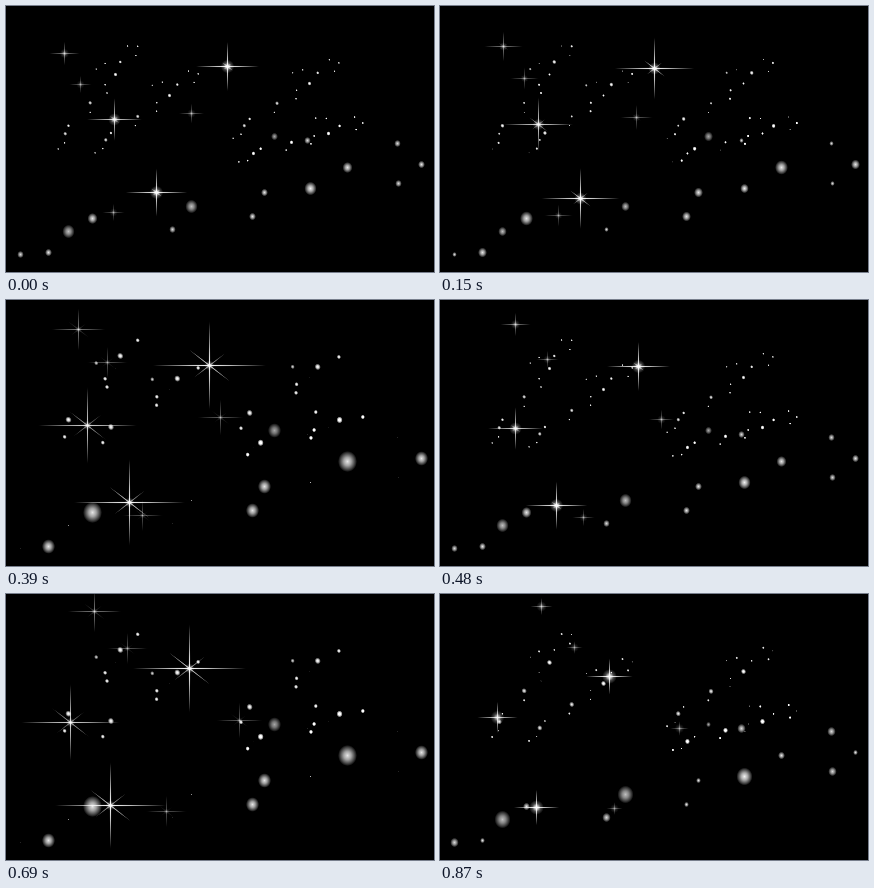
Write an HTML page with a canvas that moves like this. It is 428 px wide and 266 px high and loops after 0.9 s.

```html
<!DOCTYPE html>
<html lang="en">
<head>
<meta charset="utf-8">
<title>Night sky</title>
<style>
html, body { margin: 0; width: 100%; height: 100%; overflow: hidden; background: #000; }
canvas { display: block; }
</style>
</head>
<body>
<canvas id="sky" width="428" height="266"></canvas>
<script>
const ctx = document.getElementById('sky').getContext('2d');
const STEP = 30, STEPS = 30, TWINKLE = 10;

// Opacity from the centre outwards.
const DISC = [[0, 1], [0.4, 0.7], [0.8, 0.25], [1, 0]];
const GLOW = [[0, 1], [0.25, 0.8], [0.55, 0.3], [1, 0]];
const RAY = [[0, 1], [0.35, 0.75], [0.7, 0.36], [1, 0]];

// One trail of dots; early dots swell while the others shrink.
const trail = [
  { r: 11, alpha: 0.75, pts: [[-119, 18], [-242, 43]] },
  { r: 11, alpha: 0.95, pts: [[0, 0]] },
  { r: 5.8, alpha: 0.85, pts: [[87, -45], [88, -5], [-3, -48], [-138, 41], [-290, 66]] },
  { r: 10.6, alpha: 0.9, early: true, pts: [[37, -21], [-218, 30]] },
  { r: 7.3, alpha: 0.9, early: true, pts: [[111, -24], [-46, 4], [-58, 28], [-262, 64]] },
  { r: 7.3, alpha: 0.65, early: true, pts: [[-36, -52]] }
];

// The trail is laid out five times, turned and scaled.
const copies = [
  { x: 304, y: 182, turn: 0, scale: 1, gain: 1 },
  { x: 322, y: 127, turn: -4.8, scale: 0.316, gain: 2 },
  { x: 303, y: 77, turn: -22.8, scale: 0.316, gain: 1.35 },
  { x: 163, y: 89, turn: -24.8, scale: 0.316, gain: 1.35 },
  { x: 109, y: 68, turn: -39.6, scale: 0.316, gain: 1.35 }
];

// Each star drifts from start to bend, then on to end.
const stars = [
  { size: 1, alpha: 1, start: [221, 60], bend: [197, 66.4], end: [169, 82], at: 17 },
  { size: 0.87, alpha: 0.85, start: [108, 113], bend: [69, 131], end: [57, 123], at: 19 },
  { size: 0.98, alpha: 1, start: [150, 186], bend: [108, 210], end: [96, 213], at: 20 },
  { size: 0.48, alpha: 0.48, start: [58, 47], bend: [77.5, 21.5], end: [101, 12], at: 18 },
  { size: 0.36, alpha: 0.34, start: [74, 78], bend: [113, 55], end: [134, 53], at: 19 },
  { size: 0.41, alpha: 0.36, start: [185, 107], bend: [230, 122.5], end: [239, 134], at: 20 },
  { size: 0.36, alpha: 0.32, start: [107, 206], bend: [150, 219], end: [174, 214], at: 19 }
];

function spot(x, y, rx, ry, angle, alpha, stops) {
  ctx.save();
  ctx.translate(x, y);
  ctx.rotate(angle);
  ctx.scale(rx, ry);
  const g = ctx.createRadialGradient(0, 0, 0, 0, 0, 1);
  for (const [at, a] of stops) g.addColorStop(at, `rgba(255,255,255,${Math.min(1, a * alpha)})`);
  ctx.fillStyle = g;
  ctx.beginPath();
  ctx.arc(0, 0, 1, 0, Math.PI * 2);
  ctx.fill();
  ctx.restore();
}

// Triangle wave: 1 at step 3 of each twinkle, 0 at step 8.
const wave = step => 1 - Math.abs((step + 2) % TWINKLE - 5) / 5;

function drawTrail(copy, k) {
  ctx.save();
  ctx.translate(copy.x + 0.5, copy.y + 0.5);
  ctx.rotate(copy.turn * Math.PI / 180);
  ctx.scale(copy.scale, copy.scale);
  for (const { r, alpha, early, pts } of trail) {
    const size = r * (early ? 0.2 + 0.8 * k : 1 - 0.95 * k);
    for (const [x, y] of pts) spot(x, y, size * 0.9, size, 0, alpha * copy.gain, DISC);
  }
  ctx.restore();
}

function place({ start, bend, end, at }, step) {
  const late = step > at;
  const [a, b] = late ? [bend, end] : [start, bend];
  const f = late ? (step - at) / (STEPS - 1 - at) : step / at;
  return a.map((v, i) => Math.round(v + (b[i] - v) * f) + 0.5);
}

function drawStar(star, step, k) {
  const { size, alpha } = star;
  const [x, y] = place(star, step);
  const reach = size * (15 + 42 * k);
  const diag = size * 34 * (k - 0.2);
  const core = (8 - 3 * k) * Math.sqrt(size);
  const thick = 0.7 + 0.4 * size;
  spot(x, y, reach, thick, 0, alpha, RAY);
  spot(x, y, thick, reach * 0.78, 0, alpha, RAY);
  if (diag > 1) {
    spot(x, y, diag, 0.9, 0.66, alpha * size * 0.8, RAY);
    spot(x, y, diag * 0.75, 0.9, -0.66, alpha * size * 0.6, RAY);
  }
  spot(x, y, core, core, 0, alpha * (1 - 0.15 * k), GLOW);
}

function draw(ms) {
  const step = Math.floor(ms / STEP) % STEPS;
  const k = wave(step);
  ctx.fillStyle = '#000';
  ctx.fillRect(0, 0, 428, 266);
  copies.forEach(c => drawTrail(c, k));
  stars.forEach(s => drawStar(s, step, k));
}

const start = performance.now();
function tick() {
  draw(performance.now() - start);
  requestAnimationFrame(tick);
}
tick();
</script>
</body>
</html>
```
